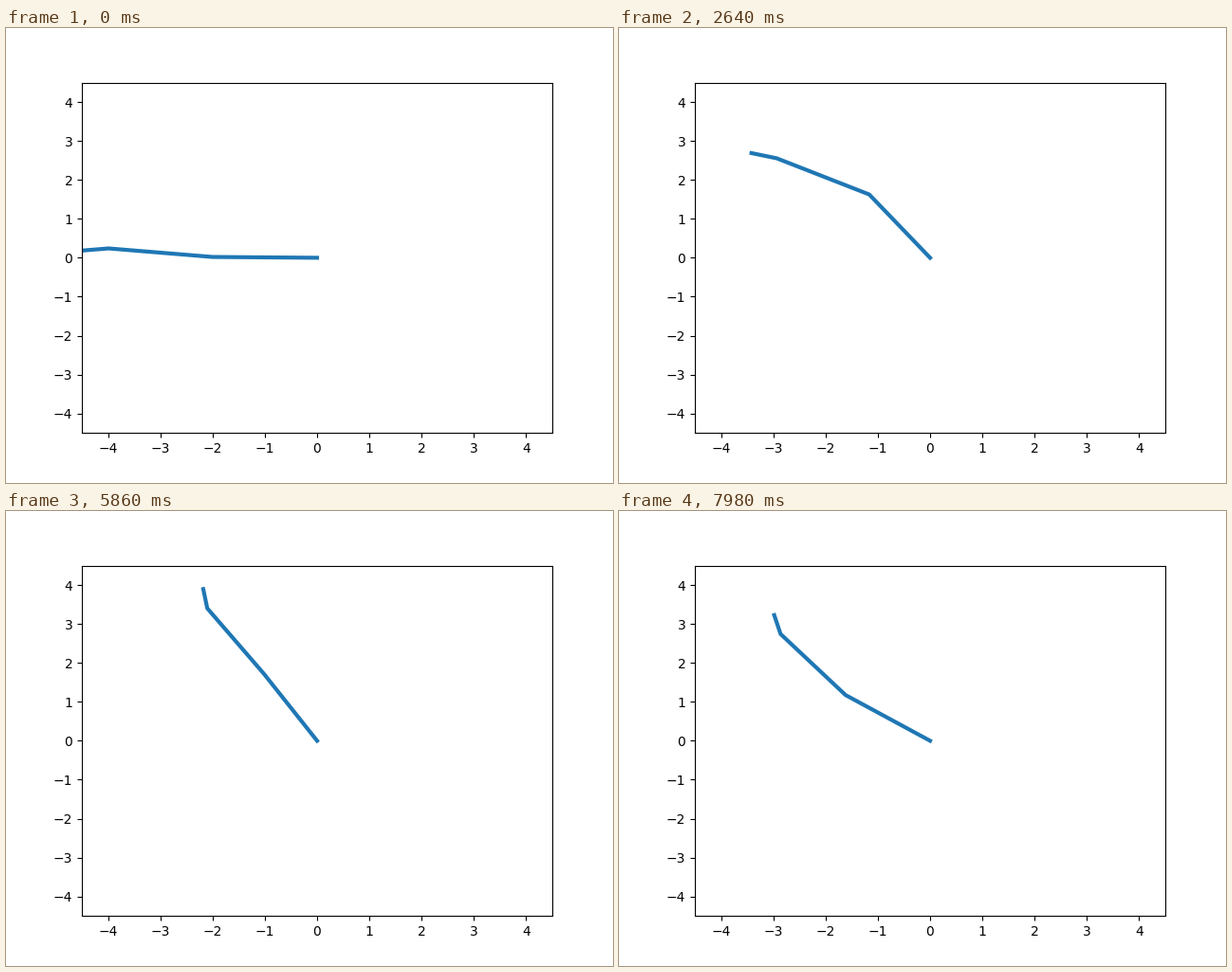
A matplotlib script for the animation above (8 s loop, 640 px wide and 480 px high).

```python
import numpy as np
import matplotlib.pyplot as plt
from matplotlib.animation import FuncAnimation

FRAMES, STEP = 400, 20
LENGTHS = np.array([2.0, 2.0, 0.5])

# Swing of the first link: (seconds, degrees above the negative x axis).
SWING = [(0, 0.6), (0.82, 16.8), (1.5, 35.25), (2.64, 54.4), (3.28, 61.5),
         (3.86, 68.1), (4.5, 70), (5.86, 59.4), (7.28, 41.7), (7.98, 36)]


def smooth_path(t, points):
    """Cubic Hermite curve through the points."""
    x, y = np.array(points, float).T
    slope = np.gradient(y, x)
    k = np.clip(np.searchsorted(x, t, side="right") - 1, 0, len(x) - 2)
    h = x[k + 1] - x[k]
    s = (t - x[k]) / h
    return (y[k] + (y[k + 1] - y[k]) * s * s * (3 - 2 * s)
            + h * s * (1 - s) * ((1 - s) * slope[k] - s * slope[k + 1]))


def ease(t, start, end):
    s = np.clip((t - start) / (end - start), 0, 1)
    return s * s * (3 - 2 * s)


t = np.arange(FRAMES) * STEP / 1000
base = smooth_path(t, SWING)
elbow = 5.7 - 32.4 * ease(t, 0, 1.5) + 42.3 * ease(t, 4.2, 7.2)
wrist = -12.5 + 36.8 / (1 + np.exp((4.35 - t) / 0.33))
angles = np.radians(np.cumsum([base, elbow, wrist], axis=0))

fig, ax = plt.subplots(figsize=(6.4, 4.8), dpi=100)
ax.set_xlim(-4.5, 4.5)
ax.set_ylim(-4.5, 4.5)
arm, = ax.plot([], [], lw=3)


def draw(i):
    x = np.cumsum(-LENGTHS * np.cos(angles[:, i]))
    y = np.cumsum(LENGTHS * np.sin(angles[:, i]))
    arm.set_data(np.r_[0, x], np.r_[0, y])
    return arm,


anim = FuncAnimation(fig, draw, frames=FRAMES, interval=STEP,
                     repeat=True, repeat_delay=0, blit=True)
plt.show()
```
